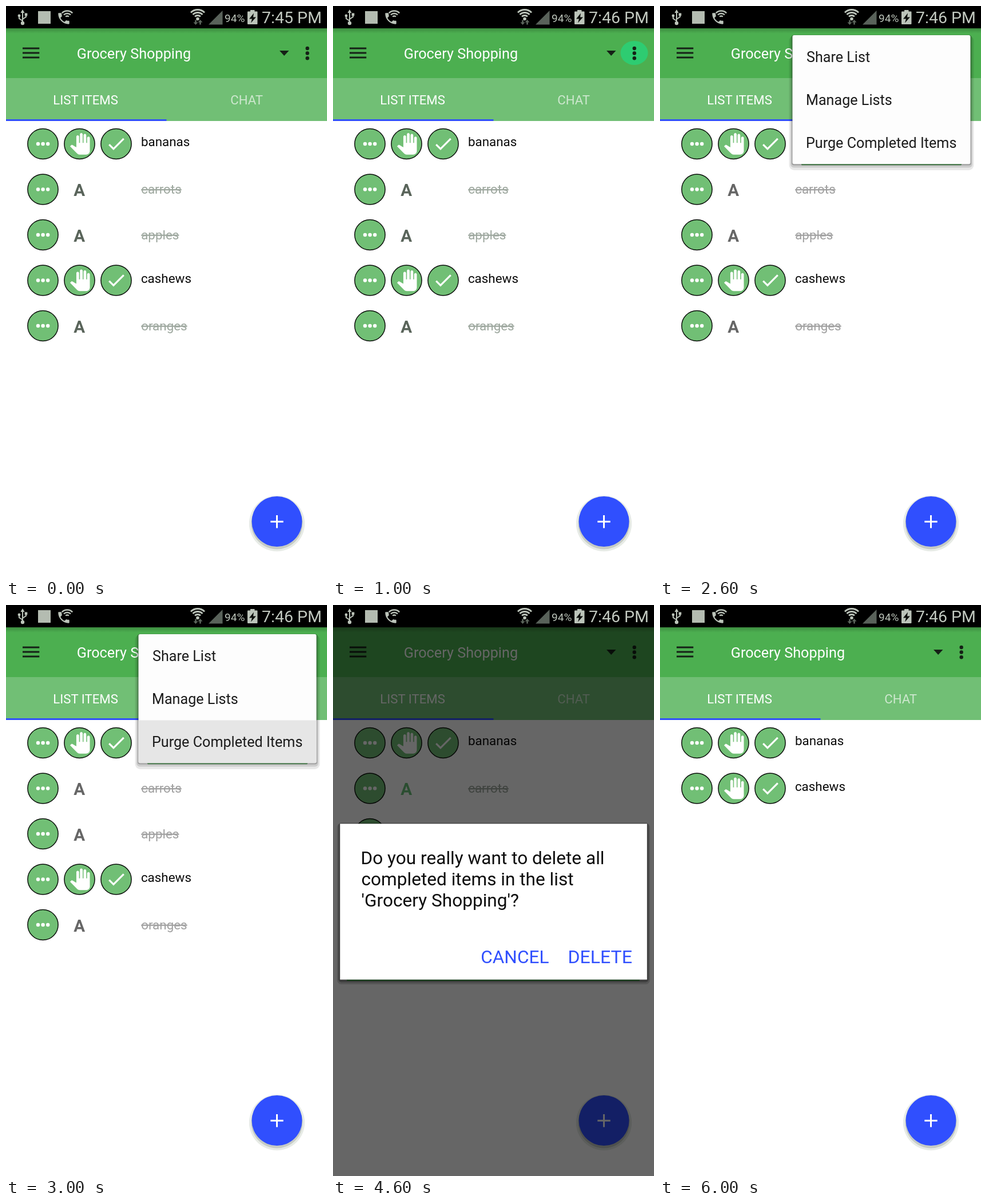
These frames come from a looping animation (561 px wide and 998 px high, 7 s). An HTML page:

```html
<!DOCTYPE html>
<html lang="en">
<head>
<meta charset="utf-8">
<title>Shopping list</title>
<style>
  html, body { margin: 0; width: 100%; height: 100%; overflow: hidden; background: #fff; }
  svg { display: block; width: 100vw; height: 100vh; font-family: Roboto, sans-serif; }
  text { white-space: pre; }
</style>
</head>
<body>
<svg id="stage" viewBox="0 0 561 998"></svg>
<script>
const stage = document.getElementById('stage');
const STEP = 1000;
const BLUE = '#304ffe';
const PALE = '#bcc4ba';

const HAND = 'M23 5.5V20c0 2.2-1.8 4-4 4h-7.3c-1.08 0-2.1-.43-2.85-1.19L1 14.83s1.26-1.23 1.3-1.25c.22-.19.49-.29.79-.29.22 0 .42.06.6.16.04.01 4.31 2.46 4.31 2.46V4c0-.83.67-1.5 1.5-1.5S11 3.17 11 4v7h1V1.5c0-.83.67-1.5 1.5-1.5S15 .67 15 1.5V11h1V2.5c0-.83.67-1.5 1.5-1.5s1.5.67 1.5 1.5V11h1V5.5c0-.83.67-1.5 1.5-1.5s1.5.67 1.5 1.5z';
const CHECK = 'M9 16.17L4.83 12l-1.42 1.41L9 19 21 7l-1.41-1.41z';
const PHONE = 'M6.62 10.79c1.44 2.83 3.76 5.14 6.59 6.59l2.2-2.2c.27-.27.67-.36 1.02-.24 1.12.37 2.33.57 3.57.57.55 0 1 .45 1 1V20c0 .55-.45 1-1 1-9.39 0-17-7.61-17-17 0-.55.45-1 1-1h3.5c.55 0 1 .45 1 1 0 1.25.2 2.45.57 3.57.11.35.03.74-.25 1.02l-2.2 2.2z';

const ITEMS = [['bananas', false], ['carrots', true], ['apples', true], ['cashews', false], ['oranges', true]];
const MENU = ['Share List', 'Manage Lists', 'Purge Completed Items'];
const QUESTION = ['Do you really want to delete all', 'completed items in the list', "'Grocery Shopping'?"];

const SCENES = [
  { time: '7:45 PM' },
  { ripple: true },
  { menu: true },
  { menu: true, hover: true },
  { dialog: true },
  { dialog: true, pressed: true },
  { purged: true }
];

const rect = (x, y, w, h, fill, extra = '') =>
  `<rect x="${x}" y="${y}" width="${w}" height="${h}" fill="${fill}" ${extra}/>`;
const dot = (x, y, r, fill, extra = '') =>
  `<circle cx="${x}" cy="${y}" r="${r}" fill="${fill}" ${extra}/>`;
const path = (d, fill, extra = '') => `<path d="${d}" fill="${fill}" ${extra}/>`;
const line = (d, color, width, extra = '') =>
  `<path d="${d}" fill="none" stroke="${color}" stroke-width="${width}" ${extra}/>`;
const label = (s, x, y, size, fill, extra = '') =>
  `<text x="${x}" y="${y}" font-size="${size}" fill="${fill}" ${extra}>${s}</text>`;
const icon = (d, x, y, k, fill) => path(d, fill, `transform="translate(${x} ${y}) scale(${k})"`);

// Upward quarter arc around a centre
function arc(cx, cy, r, color, width) {
  const q = r * Math.SQRT1_2;
  return line(`M${cx - q} ${cy - q}A${r} ${r} 0 0 1 ${cx + q} ${cy - q}`, color, width);
}

function usb() {
  return line('M29 10V30M29 26L23 22V17M29 23L35 19V15', PALE, 2) +
    path('M29 6L32.5 12H25.5z', PALE) + dot(29, 30, 3.2, PALE) +
    dot(23, 17, 2.4, PALE) + rect(32.7, 12.5, 4.6, 4.6, PALE);
}

function statusBar(time) {
  const wifi = [6, 11, 16].map(r => arc(335, 23.5, r + 1, PALE, 2.8)).join('');
  const fan = [4, 8.5, 13].map(r => arc(107, 21.5, r, PALE, 2.4)).join('');
  return rect(0, 0, 561, 39, '#000') + usb() +
    rect(56, 9, 22, 22, '#b4bcb1') +
    icon(PHONE, 88, 9, 1.08, PALE) + fan +
    wifi + dot(335, 22.5, 2.8, PALE) +
    path('M331.5 33l-4-4.500h2.700v-4h2.600v4h2.700zM339.500 24l4 4.500h-2.700v4h-2.600v-4h-2.700z', '#5c665c') +
    path('M354 32.500L378.500 8V32.500z', '#59625a') +
    label('94%', 382, 27.8, 19.1, PALE) +
    rect(427, 7, 7.5, 4, PALE) + rect(422, 9.5, 17.5, 22.5, PALE, 'rx="1"') +
    path('M433 12.500L425 22.500H430L428 29.500L437 19.500H432z', '#0a0d0a') +
    label(time, 447, 29.5, 28.5, '#c2c9c0');
}

function header(ripple) {
  const ink = '#152016';
  return rect(0, 39, 561, 87, '#4caf50') + rect(0, 39, 561, 9, 'url(#edge)') +
    [72.5, 80.5, 88.5].map(y => rect(29, y, 29.3, 3, ink)).join('') +
    label('Grocery Shopping', 123.7, 92, 25.25, '#fff') +
    path('M478 78H494.500L486.200 87z', ink) +
    (ripple ? '<ellipse cx="526.5" cy="82" rx="24" ry="21" fill="#2ecc71"/>' : '') +
    [74, 82.5, 91.2].map(y => dot(526.7, y, 3.2, ink)).join('') +
    rect(0, 126, 561, 75, '#71bf75') +
    label('LIST ITEMS', 82.3, 172.3, 22.2, '#fff') +
    label('CHAT', 392.3, 172.3, 22.2, '#cfe8d0') +
    rect(0, 198, 280.5, 3, BLUE);
}

function row([name, done], i, scene) {
  const y = 241 + 79.5 * i;
  const ring = x => dot(x, y, 26.6, '#71bf75', 'stroke="#0a0f0a" stroke-width="1.5"');
  let out = ring(64.5) + [56, 64.6, 73.2].map(x => dot(x, y, 3.2, '#fff')).join('');
  if (done) {
    const bold = scene.dialog ? '#69c078' : scene.menu ? '#666' : '#59645a';
    const grey = scene.menu ? '#a0a0a0' : '#9da79e';
    return out + label('A', 118.3, y + 91.5 - 80, 29.5, bold, 'font-weight="700"') +
      label(name, 236.2, y + 7.7, 22.4, grey, 'text-decoration="line-through"');
  }
  return out + ring(128.5) + icon(HAND, 110.4, y - 19, 1.57, '#fff') +
    ring(192.5) + icon(CHECK, 173.7, y - 19, 1.58, '#fff') +
    label(name, 235.9, y + 4, 22.4, '#0c0c0c');
}

function addButton() {
  return dot(473.5, 904.7, 48.6, '#e7ebe6') + dot(473.5, 904.5, 45, '#c6cbc5') +
    dot(473.5, 901, 44, BLUE) + line('M462.300 901.300H484.700M473.500 890.100V912.500', '#fff', 3);
}

function menu(hover) {
  return rect(225.5, 52, 323, 235, '#000', 'rx="9" opacity=".09"') +
    rect(228, 51, 318, 231.500, '#000', 'rx="6" opacity=".12"') +
    rect(230, 50.5, 314, 228, '#000', 'rx="4" opacity=".22"') +
    rect(247, 275, 280, 3.2, '#356c39', 'rx="1.5"') +
    rect(231.5, 51, 311, 225.3, '#fdfdfd', 'rx="3"') +
    (hover ? rect(231.5, 201.5, 311, 74.8, '#e6e6e6', 'rx="2"') : '') +
    MENU.map((s, i) => label(s, i ? 255 : 256, 98.3 + 75 * i, 25.15, '#1c1c1c')).join('');
}

function dialog(pressed) {
  return rect(0, 39, 561, 959, '#000', 'opacity=".6"') +
    rect(7, 381, 547, 282, '#000', 'rx="8" opacity=".16"') +
    rect(9.5, 381, 542, 278.5, '#000', 'rx="5" opacity=".28"') +
    rect(24, 653, 512, 4, '#173b1a', 'rx="1.5"') +
    rect(12.3, 382.3, 536.5, 272.4, '#fff') +
    QUESTION.map((s, i) => label(s, i ? 49.5 : 48.5, 453.3 + 37 * i, 31.6, '#0c0c0c')).join('') +
    (pressed ? rect(399, 586, 137, 56, '#adb5ea') : '') +
    label('CANCEL', 258.2, 626.2, 31.6, BLUE) +
    label('DELETE', 410.5, 626.2, 32.1, BLUE);
}

const DEFS = '<defs><linearGradient id="edge" x2="0" y2="1">' +
  '<stop stop-color="#000" stop-opacity=".2"/><stop offset="1" stop-color="#000" stop-opacity="0"/>' +
  '</linearGradient></defs>';

function draw(scene) {
  const items = scene.purged ? ITEMS.filter(it => !it[1]) : ITEMS;
  stage.innerHTML = DEFS + rect(0, 0, 561, 998, '#fff') + header(scene.ripple) +
    items.map((it, i) => row(it, i, scene)).join('') + addButton() +
    (scene.menu ? menu(scene.hover) : '') +
    (scene.dialog ? dialog(scene.pressed) : '') +
    statusBar(scene.time || '7:46 PM');
}

const start = performance.now();
let shown = -1;
function tick() {
  const n = Math.floor((performance.now() - start) / STEP) % SCENES.length;
  if (n !== shown) draw(SCENES[shown = n]);
  requestAnimationFrame(tick);
}
tick();
</script>
</body>
</html>
```
